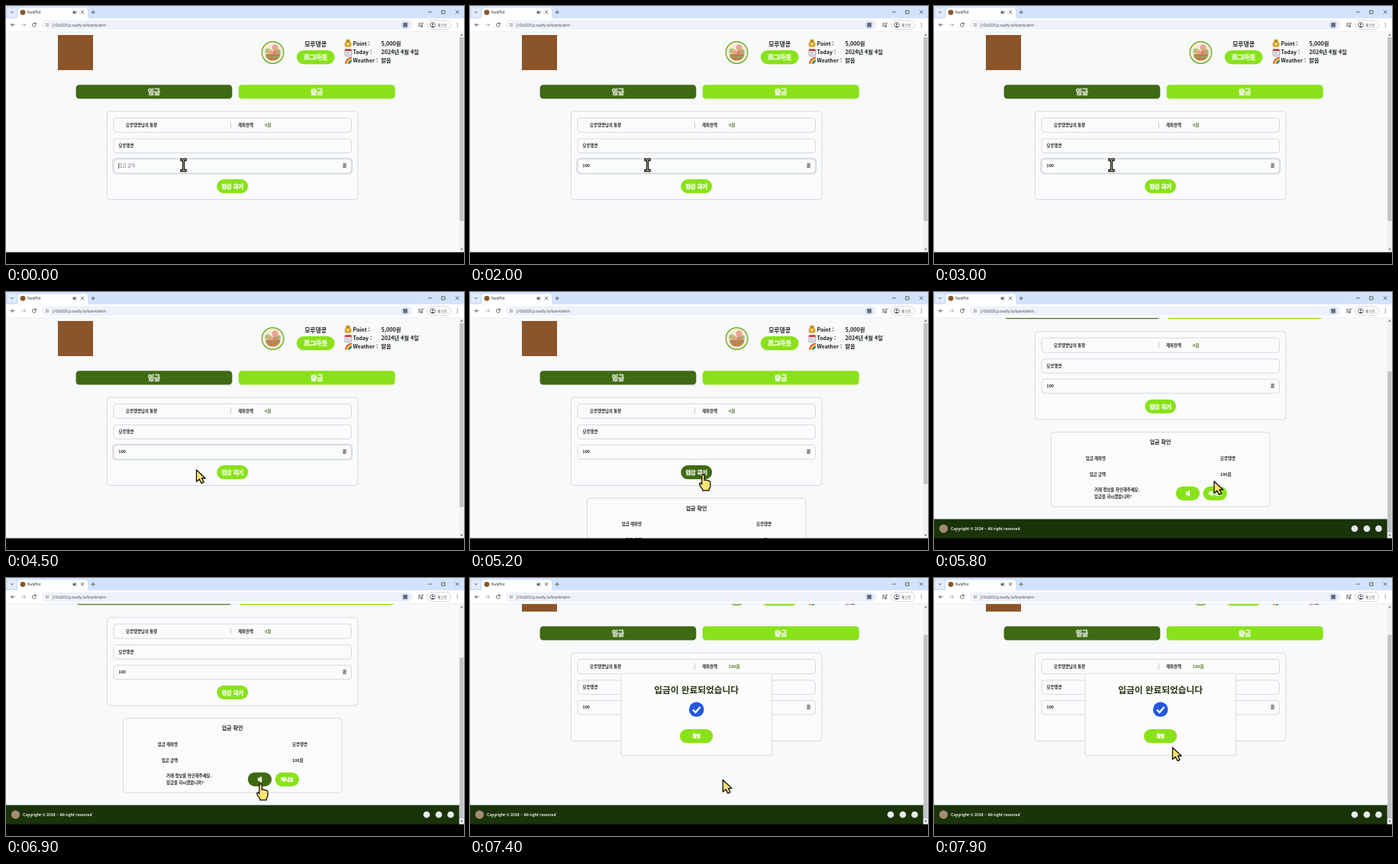
Write an HTML page that moves like this. It is 600 by 338 pixels and loops after 8 s.

```html
<!DOCTYPE html>
<html lang="ko">
<head>
<meta charset="utf-8">
<title>Bank deposit</title>
<style>
  html, body { margin: 0; width: 100%; height: 100%; overflow: hidden; }
  svg { display: block; width: 100vw; height: 100vh; }
  text { font-family: "Noto Sans CJK KR", "Noto Sans CJK", sans-serif; font-weight: 700; white-space: pre; }
  .ui { font-family: "Open Sans", "Noto Sans CJK KR", sans-serif; font-weight: 400; }
  .line { fill: none; stroke: #3c4043; stroke-width: .8; stroke-linecap: round; stroke-linejoin: round; }
  .card { fill: #fafbfc; stroke: #d5d8dd; stroke-width: 1; }
  .button rect { fill: currentColor; }
  .button text { fill: currentColor; stroke: #fff; stroke-width: .7; stroke-linejoin: round; }
  .cursor { fill: #fde36f; stroke: #111; stroke-width: 1.3; stroke-linejoin: round; }
</style>
</head>
<body>
<svg id="stage" viewBox="0 0 600 338" preserveAspectRatio="none"></svg>
<script>
const LOOP = 8000, STEP = 100;
const LIME = '#89e219', FOREST = '#3f6a14', INK = '#1d2021';
const HOLDER = '모루뎅콩';
const VIEW = { top: 34, height: 288 };
const TRACK = { top: 41, height: 274 };
const SHOW_PANEL = 5000, SHOW_MODAL = 7300;

// ---- drawing helpers ----
const rect = (x, y, w, h, fill, r = 0, extra = '') =>
  `<rect x="${x}" y="${y}" width="${w}" height="${h}" rx="${r}" fill="${fill}" ${extra}/>`;
const card = (x, y, w, h, r, extra = '') => rect(x, y, w, h, '#fafbfc', r, `class="card" ${extra}`);
const circle = (x, y, r, fill, extra = '') => `<circle cx="${x}" cy="${y}" r="${r}" fill="${fill}" ${extra}/>`;
const path = (d, extra = 'class="line"') => `<path d="${d}" ${extra}/>`;
// Text is placed by its vertical centre.
const text = (x, middle, size, string, extra = '', fill = INK) =>
  `<text x="${x}" y="${middle + size * 0.37}" font-size="${size}" fill="${fill}" ${extra}>${string}</text>`;
const centred = 'text-anchor="middle"';
const button = (id, x, y, w, h, r, size, label, color = LIME) =>
  `<g id="${id}" class="button" style="color:${color}">${rect(x, y, w, h, '', r)}
   <text x="${x + w / 2}" y="${y + h / 2 + size * 0.37}" font-size="${size}" ${centred}>${label}</text></g>`;

const avatar =
  circle(349.5, 61, 14.3, '#f5ecd6', 'stroke="#74b435" stroke-width="1.5"') +
  circle(343, 59, 3.6, '#a9c47a') + circle(356.5, 60, 3.4, '#9cbf6a') +
  circle(352.5, 54.5, 4, '#eaa294') + circle(346.5, 60.5, 3.2, '#e4ae7c') + circle(352.5, 61.5, 3.2, '#d98a78') +
  path('M340 63H359.5Q358 71.5 349.5 71.5Q341 71.5 340 63Z', 'fill="#bd7f56"') +
  path('M342 66.5H357.5', 'stroke="#8fae55" stroke-width="1.2"');

const moneyBag = path('M446 45.5L445 43.8H451L450 45.5Q453 49 452.5 51.5Q452 54 448 54Q444 54 443.5 51.5Q443 49 446 45.5Z', 'fill="#d9a52c"') +
  path('M445.8 46H450.2', 'stroke="#8a5a18" stroke-width=".9"') + circle(448, 50, 1.7, '#fbe08a');
const calendar = rect(444, 56.5, 8.6, 9, '#f0f1f3', 1, 'stroke="#6d7480" stroke-width=".6"') +
  rect(444, 56.5, 8.6, 2.6, '#cf3b45', 1) +
  path('M446 61H451M446 63.3H451', 'stroke="#7b8592" stroke-width="1" stroke-dasharray="1 .8" fill="none"');
const rainbow = ['#e2382f', '#f39a2b', '#f1d13c', '#4fae4c', '#3470c8'].map((color, i) => {
  const r = 8.2 - i * 1.3;
  return path(`M${453 - r} 75.8A${r} ${r} 0 0 1 453 ${75.8 - r}`, `fill="none" stroke="${color}" stroke-width="1.5"`);
}).join('');

const header =
  rect(68, 38, 46, 46, '#8c5429') + avatar +
  text(405.5, 50.5, 7.8, HOLDER, centred) +
  button('logout', 380.7, 58, 49.8, 18.2, 9.1, 8.4, '로그아웃') +
  moneyBag + calendar + rainbow +
  [['Point :', '5,000원', 49], ['Today :', '2024년 4월 4일', 60], ['Weather :', '맑음', 71]]
    .map(([label, value, y]) => text(454.5, y, 6.9, label) + text(491.5, y, 7.2, value)).join('');

const form =
  button('deposit', 91.6, 103.3, 204.7, 18.3, 4.5, 8.7, '입금', FOREST) +
  button('withdraw', 304.7, 103.3, 205, 18.3, 4.5, 8.7, '출금') +
  card(132.5, 138, 328.5, 115.5, 4) +
  card(141, 146.5, 311.5, 19, 4) + card(141, 174, 311.5, 18.5, 4) +
  rect(140.6, 200.2, 312.3, 18.8, 'none', 4, 'id="ring" stroke="#dde1e4" stroke-width="3"') +
  card(141, 200.5, 311.5, 18.5, 4) +
  text(157, 156, 5.4, HOLDER + '님의 통장') + path('M294.5 151.5V160', 'stroke="#c9ccd0"') +
  text(304, 156, 5.4, '계좌잔액') + text(339, 156, 5.4, '0원', 'id="balance"', '#56701f') +
  text(147.5, 183, 5.4, HOLDER) +
  text(147.5, 209.5, 5.4, '', 'id="amount"') + rect(147.5, 206, .6, 7, INK, 0, 'id="caret"') +
  text(441, 209.5, 5.4, '원') +
  button('submit', 276.3, 227, 40.8, 18.3, 9.1, 7.2, '입금 하기');

const panel = `<g id="panel">` + card(153.5, 270, 286.5, 97.5, 4) +
  text(296.5, 283, 7, '입금 확인', centred) +
  text(225, 304, 5.4, '입금 계좌명', 'text-anchor="end"') + text(375, 304, 5.4, HOLDER) +
  text(225, 325, 5.4, '입금 금액', 'text-anchor="end"') + text(375, 325, 5.4, '100원') +
  text(210, 345, 5.4, '거래 정보를 확인해주세요.') + text(210, 354, 5.4, '입금을 하시겠습니까?') +
  button('yes', 316.8, 341, 31.2, 18.3, 9.1, 6, '네') +
  button('no', 352.6, 341, 31.2, 18.3, 9.1, 6, '아니오') + '</g>';

// Footer is drawn at its bottom-of-page position on screen.
const footer = `<g id="footer">` + rect(0, 297.5, 594, 26, '#1a3309') +
  circle(12.5, 310, 5.6, '#a58a76') +
  text(22, 309.8, 4.95, 'Copyright © 2024 ~ All right reserved', '', '#f4f6f1') +
  [551, 567, 582.5].map(x => circle(x, 310, 4.3, '#e6ecee')).join('') + '</g>';

const modal = `<g id="modal">` + rect(198, 125, 197.5, 107.5, '#fcfcfd', 2, 'stroke="#dadada" stroke-width="1"') +
  text(296.7, 146.5, 11.7, '입금이 완료되었습니다', centred, '#20340f') +
  circle(296.7, 172.3, 9.8, '#2558e0') +
  path('M292 172.6L295.4 176L301.6 169', 'fill="none" stroke="#fff" stroke-width="2.4"') +
  button('confirm', 275, 198, 43.3, 18.3, 9.1, 5.4, '확인') + '</g>';

const scrollbar = rect(593.7, 34, 6.3, 289, '#f1f2f3') + rect(594.3, 41, 5.2, 0, '#bfc1c2', 0, 'id="thumb"') +
  path('M595.2 38.8L597 36.4L598.8 38.8ZM595.2 317.8L597 320.2L598.8 317.8Z', 'fill="#6c6c6c"');

const browser =
  rect(0, 0, 600, 20, '#d3e2fb') + rect(2, 2.5, 11.5, 11.5, '#e4edfc', 3.5) +
  path('M6.2 7.3L8 9.1L9.8 7.3') +
  path('M12 16.5Q15.5 16.5 15.5 13V6Q15.5 2.5 19 2.5H103.5Q107 2.5 107 6V13Q107 16.5 110.5 16.5Z', 'fill="#fff"') +
  circle(22, 8.3, 3.4, '#8c5429') + text(28, 8.3, 4.7, 'NubPlot', 'class="ui"') +
  path('M87.6 7.2H88.8L90.3 5.8V10.8L88.8 9.4H87.6Z', 'fill="#3c4043"') + path('M91.6 6.8Q92.6 8.3 91.6 9.8') +
  path('M98.4 6.5L101.8 9.9M101.8 6.5L98.4 9.9M112 8.2H116.4M114.2 6V10.4') +
  path('M553.5 8H557.5M571 6H575V10H571ZM589.2 6L593.2 10M593.2 6L589.2 10') +
  rect(0, 16.2, 600, 17.8, '#fff') + path('M0 33.7H600', 'stroke="#e3e6ea" stroke-width=".6"') +
  path('M11.2 24.7H6.7M8.7 22.7L6.7 24.7L8.7 26.7') +
  `<g opacity=".45">${path('M21 24.7H25.4M23.4 22.7L25.4 24.7L23.4 26.7')}</g>` +
  path('M39 23.4A2.4 2.4 0 1 0 39.2 25.6M39.3 21.8V23.7H37.4') +
  rect(47, 18.8, 486, 12, '#edf1f9', 6) + circle(54, 24.8, 4.4, '#fff') +
  path('M52.2 23.6H54M55.8 26H54') + circle(55.3, 23.6, .7, '#3c4043') + circle(52.7, 26, .7, '#3c4043') +
  text(61, 24.8, 5.3, 'j10d203.p.ssafy.io/bank/atm', 'class="ui"', '#3c4043') +
  circle(523, 24.8, 5.6, '#dbe3f2') + rect(520.2, 22, 5.6, 5.6, '#5c6b84') +
  path('M540.5 22.8H543.5M540.5 24.8H543M540.5 26.8H542M545.2 26.5V22.2H546.6') + circle(544.4, 26.7, 1.1, '#3c4043') +
  rect(552, 18.8, 30.5, 12, '#fff', 6, 'stroke="#c8ccd3" stroke-width=".8"') +
  circle(559, 24.8, 3.3, 'none', 'stroke="#4b5563" stroke-width=".8"') + circle(559, 23.9, 1.1, '#4b5563') +
  path('M556.9 27Q559 25.2 561.1 27Q559 28.9 556.9 27Z', 'fill="#4b5563"') +
  text(565, 24.8, 4.8, '게스트', 'class="ui"', '#3c4043') +
  [22.6, 24.8, 27].map(y => circle(591.3, y, .6, '#3c4043')).join('');

const cursors =
  path('M-3.6 -8.3H-.8L0 -7.8L.8 -8.3H3.6V-6H1V6H3.6V8.3H.8L0 7.8L-.8 8.3H-3.6V6H-1V-6H-3.6Z',
    'id="ibeam" class="cursor" style="fill:#f3e7b4"') +
  path('M0 0V15.6L3.8 12.3L6.6 17.6L9.6 16.1L7 11H11.6Z', 'id="arrow" class="cursor"') +
  path('M-1.7 2A1.7 1.7 0 0 1 1.7 2V8Q3.3 6.6 4.8 8.2Q6.3 7.2 7.3 8.9Q9.4 8.4 9.4 11V15Q9.4 18 7.8 19.5V21.4H-.8V19.6Q-3 17.5 -4.7 13.4Q-5.2 11.2 -3.2 11.4L-1.7 13.2Z',
    'id="hand" class="cursor"');

const stage = document.getElementById('stage');
stage.innerHTML = rect(0, 0, 600, 338, '#f7f9fa') +
  `<g id="page">${header}${form}${panel}</g>${footer}${modal}${scrollbar}${browser}` +
  rect(0, 322.6, 600, 15.4, '#000') + `<g id="pointer">${cursors}</g>`;

// ---- motion ----
const $ = id => document.getElementById(id);
const show = (id, on) => $(id).setAttribute('visibility', on ? 'inherit' : 'hidden');
const move = (id, x, y) => $(id).setAttribute('transform', `translate(${x} ${y})`);
const smooth = (from, to, t) => {
  const u = Math.min(1, Math.max(0, (t - from) / (to - from)));
  return u * u * (3 - 2 * u);
};

const pointerPath = [
  [0, 232.5, 208.5], [4400, 232.5, 208.5], [4500, 249.5, 233], [4800, 294, 237], [5100, 294, 237],
  [5500, 367, 248], [6300, 367, 248], [6800, 333.5, 269.5], [7300, 333.5, 269.5], [7800, 312.5, 222], [LOOP, 312.5, 222]
];
function pointerAt(t) {
  const i = pointerPath.findIndex(key => key[0] > t);
  const [t0, x0, y0] = pointerPath[i - 1], [t1, x1, y1] = pointerPath[i];
  const u = smooth(t0, t1, t);
  return [x0 + (x1 - x0) * u, y0 + (y1 - y0) * u];
}

const typed = t => t < 1000 ? '' : t < 1100 ? '1' : t < 1400 ? '10' : '100';
const caretOn = t => t < 600 || (t >= 1000 && t < 2000) || (t >= 2500 && t < 3000) || (t >= 3600 && t < 4100);

function hovers(id, x, y) {
  const r = $(id).firstElementChild, n = name => +r.getAttribute(name);
  return x > n('x') && x < n('x') + n('width') && y > n('y') && y < n('y') + n('height');
}

function render(t) {
  const panelOn = t >= SHOW_PANEL && t < SHOW_MODAL, modalOn = t >= SHOW_MODAL;
  const maxScroll = panelOn ? 86.3 : 40;
  const scroll = Math.min(maxScroll, 86.3 * smooth(5560, 5800, t));
  const content = VIEW.height + maxScroll;
  move('page', 0, -scroll);
  move('footer', 0, maxScroll - scroll);
  $('thumb').setAttribute('y', TRACK.top + TRACK.height * scroll / content);
  $('thumb').setAttribute('height', TRACK.height * VIEW.height / content);

  show('panel', panelOn);
  show('modal', modalOn);
  $('modal').setAttribute('opacity', smooth(SHOW_MODAL - 100, SHOW_MODAL + 100, t));
  $('balance').textContent = modalOn ? '100원' : '0원';

  const amount = typed(t);
  $('amount').textContent = amount || '입금 금액';
  $('amount').style.cssText = amount ? '' : 'fill:#6f757b;font-weight:400';
  $('caret').setAttribute('x', 147.3 + amount.length * 3.2);
  show('caret', caretOn(t));
  show('ring', t < SHOW_PANEL);

  const [x, y] = pointerAt(t);
  let overButton = false;
  for (const id of ['submit', 'yes', 'no']) {
    const active = id === 'submit' || panelOn;
    const over = active && !modalOn && hovers(id, x, y + scroll);
    $(id).style.color = over ? FOREST : LIME;
    overButton ||= over;
  }
  const shape = t < 4500 ? 'ibeam' : overButton ? 'hand' : 'arrow';
  for (const id of ['ibeam', 'arrow', 'hand']) show(id, id === shape);
  move('pointer', x, y);
}

const start = performance.now();
function tick() {
  const t = (performance.now() - start) % LOOP;
  render(Math.floor(t / STEP) * STEP);
  requestAnimationFrame(tick);
}
tick();
</script>
</body>
</html>
```
